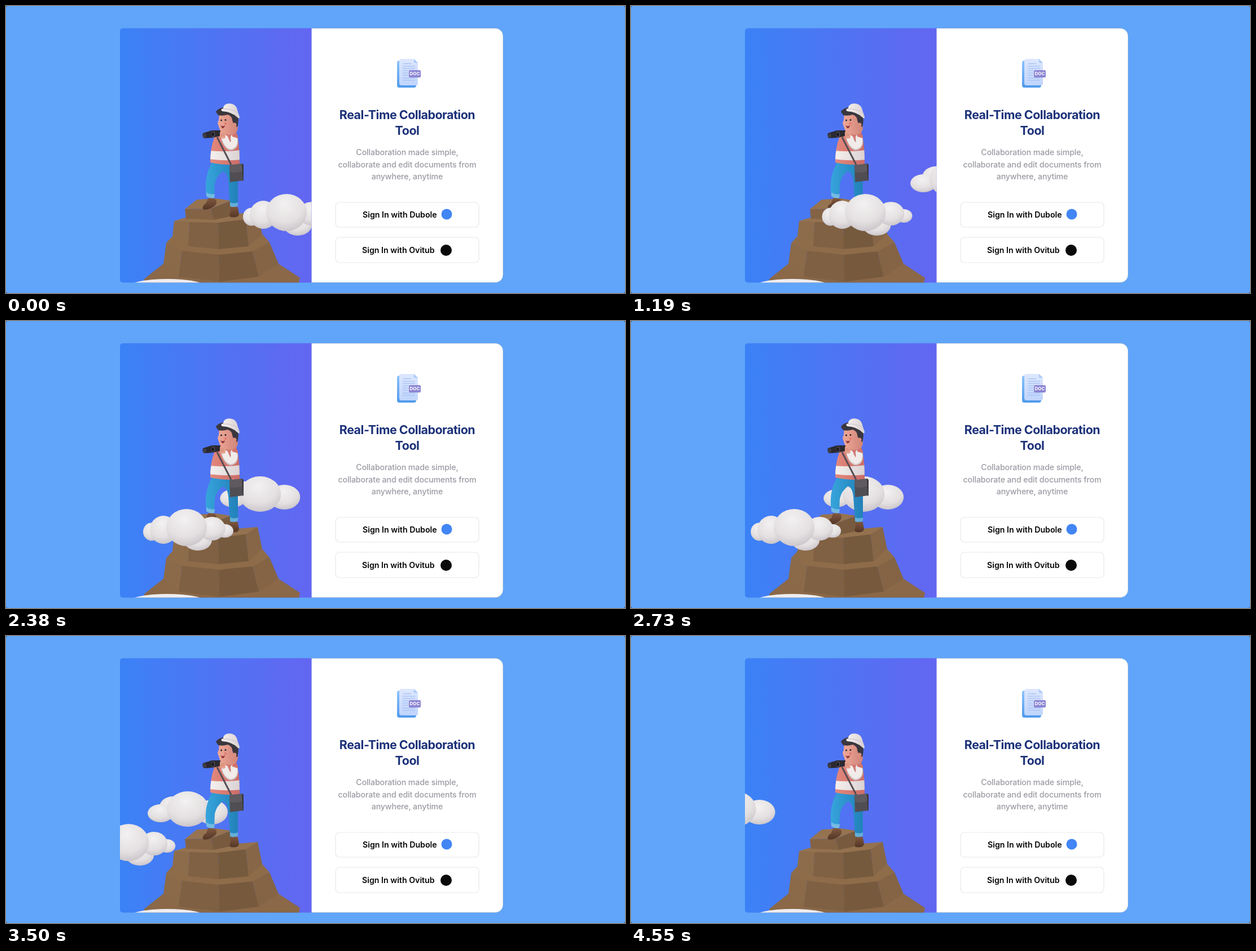
Recreate the animation shown at these times as an HTML page. Size 1097 by 510 pixels, loop 4620 ms.

```html
<!DOCTYPE html>
<html lang="en">
<head>
<meta charset="utf-8">
<title>Sign in</title>
<style>
  @property --t { syntax: '<number>'; inherits: true; initial-value: 0; }
  html, body { margin: 0; width: 100%; height: 100%; overflow: hidden; background: #1d3556; }
  svg { display: block; width: 1097px; height: 510px; animation: drift 4620ms steps(66) -3ms infinite; }
  @keyframes drift { from { --t: 0; } to { --t: 1; } }

  /* clouds accelerate to the left: start - a*t - b*t^2 */
  .cloud { transform: translateX(calc(1px * (var(--x) - var(--a) * var(--t) - var(--b) * var(--t) * var(--t)))); }
  .back { --x: 589.6; --a: 325.7; --b: 160.1; }
  .front { --x: 420; --a: 289.2; --b: 105.7; }
  .puff ellipse { fill: url(#puff); }

  text { font-family: Inter, 'Open Sans', sans-serif; }
  .title { font-size: 21.4px; font-weight: 700; letter-spacing: -.022em; fill: #1c3179; text-anchor: middle; }
  .note { font-size: 14.2px; font-weight: 500; letter-spacing: -.13px; fill: #9b9ca4; text-anchor: middle; }
  .label { font-size: 14.2px; font-weight: 600; fill: #050505; }
  .button { fill: #fff; stroke: #e7e8ec; stroke-width: 1.2; }
  .tag { font-size: 8px; font-weight: 700; fill: #fff; text-anchor: middle; }
</style>
</head>
<body>
<svg viewBox="0 0 1097 510">
  <defs>
    <linearGradient id="sky"><stop stop-color="#3b82f6"/><stop offset="1" stop-color="#6366f1"/></linearGradient>
    <radialGradient id="puff" cx=".45" cy=".28" r=".8">
      <stop stop-color="#f3f1f1"/><stop offset=".6" stop-color="#e4e0e1"/><stop offset="1" stop-color="#c4bec4"/>
    </radialGradient>
    <linearGradient id="skin"><stop stop-color="#efa998"/><stop offset="1" stop-color="#cf8478"/></linearGradient>
    <linearGradient id="shirt"><stop stop-color="#e58a7e"/><stop offset="1" stop-color="#c96b66"/></linearGradient>
    <linearGradient id="linen"><stop stop-color="#f6f1ef"/><stop offset="1" stop-color="#d9d1d2"/></linearGradient>
    <linearGradient id="jeans"><stop stop-color="#37a4dc"/><stop offset="1" stop-color="#2180b8"/></linearGradient>
    <linearGradient id="shoe" x2="0" y2="1"><stop stop-color="#82593f"/><stop offset="1" stop-color="#533627"/></linearGradient>
    <linearGradient id="sheet" x2="0" y2="1"><stop stop-color="#dde7fe"/><stop offset="1" stop-color="#c0d5fc"/></linearGradient>
    <linearGradient id="under" x2="0" y2="1"><stop stop-color="#8cc3fa"/><stop offset="1" stop-color="#4f9aec"/></linearGradient>
    <clipPath id="panel"><path d="M541.500 39.500H207a5 5 0 0 0-5 5V486.500a5 5 0 0 0 5 5H541.500z"/></clipPath>
    <clipPath id="torso"><path d="M374 223Q390 217 408 224Q414 240 414 281Q388 284 362 278Q362 252 369 234Z"/></clipPath>
  </defs>

  <rect width="1097" height="510" rx="3" fill="#60a5fa"/>
  <path d="M541 39.500H867a14 14 0 0 1 14 14V477.500a14 14 0 0 1-14 14H541z" fill="#fff" stroke="#6d8fb8" stroke-opacity=".5"/>

  <g clip-path="url(#panel)">
    <rect x="202" y="39" width="340" height="453" fill="url(#sky)"/>

    <g class="cloud back puff">
      <ellipse cx="45" cy="304" rx="24" ry="19"/>
      <ellipse cx="23" cy="315" rx="23" ry="16"/>
      <ellipse cx="114" cy="313" rx="28" ry="22"/>
      <ellipse cx="71" cy="307.500" rx="37" ry="31.500"/>
    </g>

    <g id="mountain">
      <path d="M245 485L279 458L483 458L521 483L519 493H246Z" fill="#8a6848"/>
      <path d="M284 421L296 408L453 404L467 420L437 437L377 443L312 436Z" fill="#8e6c4a"/>
      <path d="M284 421L312 435L306 481L279 458Z" fill="#8b6a49"/>
      <path d="M312 435L377 442L378 490L306 481Z" fill="#7f6042"/>
      <path d="M377 442L437 436L448 481L378 490Z" fill="#775a3d"/>
      <path d="M437 436L467 420L483 458L448 481Z" fill="#846445"/>
      <path d="M298 382L318 376L410 369L446 366L425 381L376 386L325 385Z" fill="#947250"/>
      <path d="M298 382L325 384L323 427L295 409Z" fill="#8d6c4b"/>
      <path d="M325 384L376 385L377 432L323 427Z" fill="#816143"/>
      <path d="M376 385L425 379L430 427L377 432Z" fill="#765a3d"/>
      <path d="M425 379L446 366L454 405L430 427Z" fill="#866646"/>
      <path d="M317 361L338 344L372 342L399 346L363 360Z" fill="#967350"/>
      <path d="M317 361L363 360L368 380L319 378Z" fill="#846345"/>
      <path d="M363 360L399 346L411 371L368 380Z" fill="#785b3e"/>
    </g>
    <ellipse cx="286" cy="498" rx="66" ry="13" fill="#efedef"/>

    <g id="man">
      <path d="M397 357Q405 353 411 358L413 370Q412 377 398 375Q395 371 398 366Z" fill="url(#shoe)"/>
      <path d="M358 342Q366 339 372 344Q375 350 370 355Q358 364 349 361Q347 355 355 350Z" fill="url(#shoe)"/>
      <path d="M366 277L412 280Q413 292 411 305L411 354Q404 358 397 354L394 312Q392 295 384 294Q373 302 370 316L369 340Q361 342 355 337Q350 302 366 277Z" fill="url(#jeans)"/>
      <path d="M355 331Q362 336 370 334L369 341Q361 343 355 338Z" fill="#74bbe2"/>
      <path d="M397 349Q404 352 411 349V355Q404 359 397 356Z" fill="#65aed8"/>

      <g clip-path="url(#torso)">
        <rect x="360" y="216" width="56" height="70" fill="url(#shirt)"/>
        <path d="M360 257Q388 260 416 256V273Q388 276 360 272Z" fill="url(#linen)"/>
      </g>
      <path d="M374 233L399 282" stroke="#574e54" stroke-width="3" fill="none"/>
      <path d="M404 234Q407 249 398 250Q392 248 388 236" fill="none" stroke="#cfc5c8" stroke-width="13" stroke-linecap="round"/>
      <path d="M404 234Q406 247 398 248.500Q392 247 388 235" fill="none" stroke="#f1ecea" stroke-width="11" stroke-linecap="round"/>
      <path d="M401 225Q412 226 411 235L401 232Z" fill="#d0736b"/>

      <path d="M396 283L419 280L421 310L397 313Z" fill="#504d53"/>
      <path d="M396 283L419 280L420 293Q408 298 397 295Z" fill="#5e5a5f"/>
      <path d="M418 280L421 282V310L420 311Z" fill="#38363b"/>

      <path d="M378 190Q395 186 408 194L411 215Q411 229 396 229Q381 228 378 217L375 208Q376 204 377 203Z" fill="url(#skin)"/>
      <path d="M372 188Q377 180 389 180L411 190Q413 205 410 215L404 212L401 203Q401 196 393 193Q384 196 376 194Z" fill="#3a373e"/>
      <circle cx="405" cy="211" r="3.500" fill="#d98e7e"/>
      <circle cx="381.500" cy="203" r="1.500" fill="#272229"/>
      <circle cx="389" cy="202.500" r="1.500" fill="#272229"/>
      <circle cx="389" cy="209" r="2.200" fill="#e47c72"/>
      <path d="M380 212Q384 215 388 212Q387 218 383 217Z" fill="#8e3038"/>
      <path d="M385 182C385 170 408 170 410 185L414 197Q414 202 410 198Q400 188 383 187Q379 183 385 182Z" fill="url(#linen)"/>
      <path d="M384 183Q400 182 411 190" fill="none" stroke="#c9c0c6"/>

      <path d="M349 226L365 221L380 221V231L366 234L351 235Q347 231 349 226Z" fill="#2b2930"/>
      <ellipse cx="352" cy="230.500" rx="3" ry="4.200" fill="#3f3d45"/>
      <ellipse cx="367" cy="228" rx="3.500" ry="5.500" fill="#4a4650"/>
      <ellipse cx="366.500" cy="228" rx="2" ry="3.500" fill="#17161b"/>
      <path d="M379 224Q384 219 388 226L389 234Q384 238 379 233Z" fill="#e59f8c"/>
      <path d="M380 228L386 227M380 231L387 230" stroke="#c97c6c" stroke-width=".8"/>
    </g>

    <g class="cloud front puff">
      <ellipse cx="15" cy="374.500" rx="15" ry="16"/>
      <ellipse cx="145" cy="373" rx="15" ry="12"/>
      <ellipse cx="97" cy="389" rx="25" ry="19"/>
      <ellipse cx="122" cy="369" rx="24" ry="21"/>
      <ellipse cx="36" cy="371" rx="24" ry="25"/>
      <ellipse cx="77" cy="367" rx="36" ry="33"/>
    </g>
  </g>

  <g id="doc">
    <rect x="693" y="97" width="34" height="48" rx="4" fill="url(#under)"/>
    <path d="M701 94H723L730 101V137a4 4 0 0 1-4 4H701a4 4 0 0 1-4-4V98a4 4 0 0 1 4-4Z" fill="url(#sheet)"/>
    <path d="M723 94L730 101H725a2 2 0 0 1-2-2Z" fill="#a9c9f9"/>
    <path d="M704 102.500H718M703 107H725M703 111H725M703 115H713M703 119H713M703 123H713M703 128H725M703 132H725" stroke="#9db8ef"/>
    <rect x="714" y="114" width="21" height="13" rx="2" fill="#8d85d3"/>
    <text class="tag" x="724.500" y="123.300">DOC</text>
  </g>

  <text class="title"><tspan x="711" y="200.500">Real-Time Collaboration</tspan><tspan x="711" y="229">Tool</tspan></text>
  <text class="note"><tspan x="711" y="265.200">Collaboration made simple,</tspan><tspan x="711" y="286.600">collaborate and edit documents from</tspan><tspan x="711" y="308">anywhere, anytime</tspan></text>

  <rect class="button" x="584" y="349" width="254" height="44" rx="7"/>
  <text class="label" x="632" y="376.300">Sign In with Dubole</text>
  <circle cx="781" cy="370" r="9.500" fill="#4285f4"/>

  <rect class="button" x="584" y="411" width="254" height="45" rx="7"/>
  <text class="label" x="631" y="438.600">Sign In with Ovitub</text>
  <circle cx="780" cy="434" r="10" fill="#0a0a0a"/>
</svg>
</body>
</html>
```
